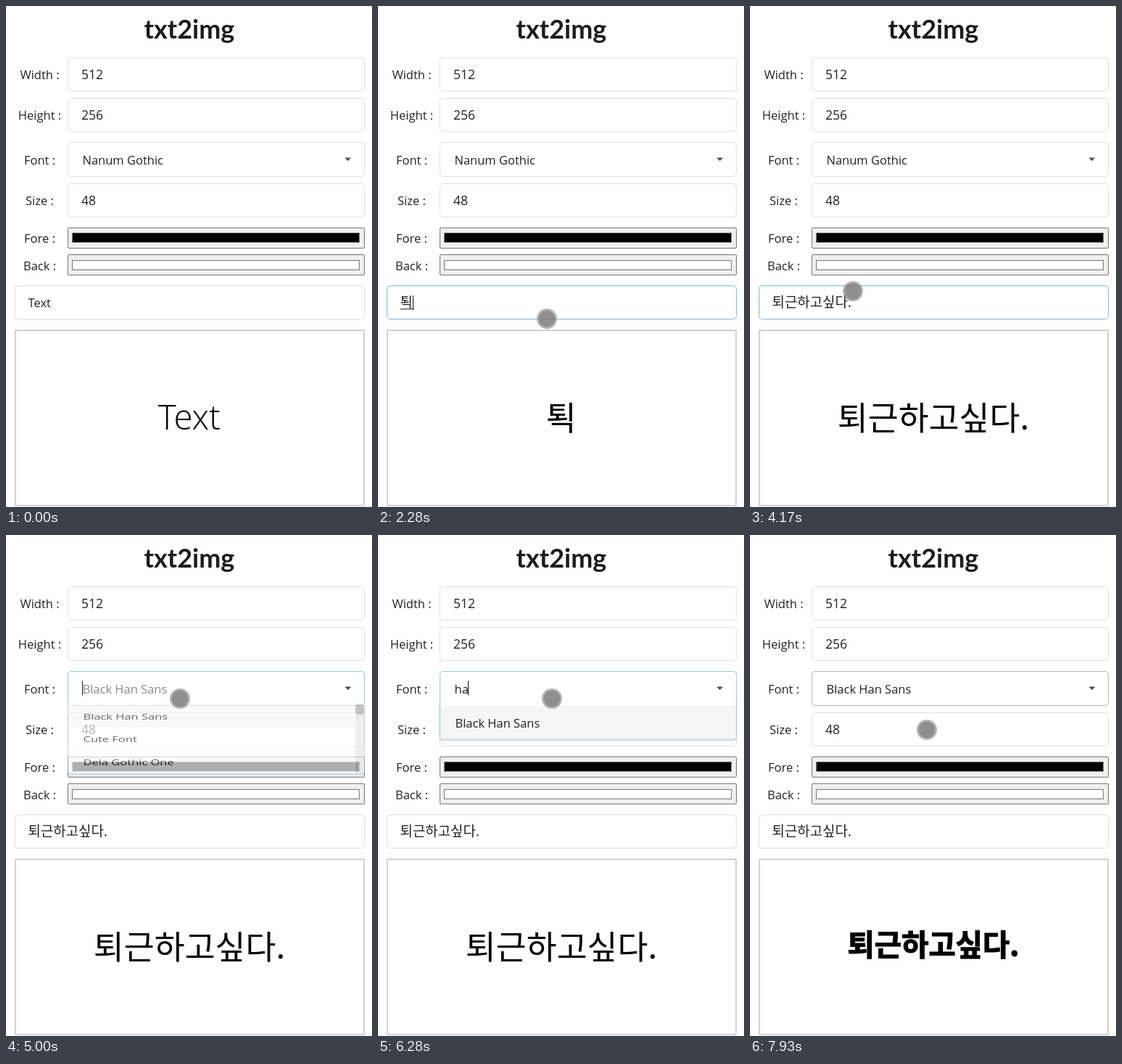
These frames come from a looping animation (505x692 px, 8 s). An HTML page:

```html
<!DOCTYPE html>
<html lang="ko">
<head>
<meta charset="utf-8">
<title>txt2img</title>
<style>
html, body { margin: 0; width: 100%; height: 100%; overflow: hidden; background: #fff; }
svg { display: block; width: 505px; height: 692px; }
text { font: 16.5px "Open Sans", "Noto Sans", sans-serif; fill: #222; white-space: pre; }
.title { font: 700 36px Lato, sans-serif; fill: #1b1c1d; }
.label, .title, #preview { text-anchor: middle; }
.num { font-size: 17.6px; }
.box { fill: #fff; stroke: #dededf; }
.well { fill: #efefef; stroke: #767676; }
.swatch { stroke: #777; }
#entry { font-family: "Open Sans", "Noto Sans CJK KR", sans-serif; }
#entry.ko { font: 300 18.9px "Noto Sans CJK KR", sans-serif; }
#pick.dim { fill: #8b8b8b; }
#preview { fill: #000; }
#preview.latin { font: 300 47.5px "Open Sans", sans-serif; }
#preview.ko { font: 400 45.6px "Noto Sans CJK KR", sans-serif; }
#preview.wide { font: 400 48px "Noto Sans CJK KR", sans-serif; }
#preview.black { font: 900 40.5px "Noto Sans CJK KR", sans-serif; stroke: #000; stroke-width: 1.2px; }

.step { animation: 8s step-end infinite; }
#field { animation-name: field; }
#select { animation-name: select; }
#full { animation-name: full; }
#one { animation-name: one; }
#hit { animation-name: hit; }
#mark { animation-name: mark; }
#menu { transform-origin: 0 231px; animation: menu 8s linear infinite; filter: drop-shadow(0 2px 1.5px rgba(34,36,38,.15)); }
#pointer { animation: move 8s linear infinite, appear 8s step-end infinite; }

@keyframes field { 0% { stroke: #dededf } 14.5% { stroke: #85b7d9 } 60.8% { stroke: #dededf } }
@keyframes select { 0% { stroke: #dededf } 60.8% { stroke: #96c8da } 89.25% { stroke: #b5b5b6 } }
@keyframes full { 0% { visibility: visible } 78.5% { visibility: hidden } }
@keyframes one { 0% { visibility: hidden } 78.5% { visibility: visible } }
@keyframes hit { 0% { font-weight: 400 } 85.1% { font-weight: 700 } }
@keyframes mark { 0% { visibility: hidden } 16.1% { visibility: visible } 19.35% { visibility: hidden } }
@keyframes menu {
  0%, 60.8% { transform: scaleY(0); opacity: 0 }
  63.3%, 89% { transform: none; opacity: 1 }
  91.75%, 100% { transform: scaleY(0); opacity: 0 }
}
@keyframes appear { 0% { visibility: hidden } 5% { visibility: visible } }
@keyframes move {
  0%, 5% { transform: translate(425px, 653px) }
  8% { transform: translate(350px, 585px) }
  10.5% { transform: translate(266px, 515px) }
  12.5% { transform: translate(224px, 477px) }
  14.5%, 48.2% { transform: translate(233px, 432px) }
  49.4% { transform: translate(226px, 437px) }
  50.5% { transform: translate(196px, 428px) }
  52.1%, 52.9% { transform: translate(142px, 394px) }
  53.8% { transform: translate(130px, 363px) }
  55.3% { transform: translate(148px, 310px) }
  56.8% { transform: translate(196px, 262px) }
  58.2% { transform: translate(234px, 235px) }
  60%, 96.8% { transform: translate(240px, 226px) }
  98.2% { transform: translate(243px, 258px) }
  99.1%, 100% { transform: translate(244px, 269px) }
}
</style>
</head>
<body>
<svg viewBox="0 0 505 692">
  <text class="title" x="253" y="45">txt2img</text>

  <text class="label" x="46.5" y="101">Width :</text>
  <text class="label" x="46.5" y="157">Height :</text>
  <text class="label" x="46.5" y="219">Font :</text>
  <text class="label" x="46.5" y="275">Size :</text>
  <text class="label" x="46.5" y="327">Fore :</text>
  <text class="label" x="46.5" y="365">Back :</text>

  <rect class="box" x="85.5" y="71.5" width="409" height="46" rx="4"/>
  <text class="num" x="104" y="101">512</text>
  <rect class="box" x="85.5" y="127.5" width="409" height="46" rx="4"/>
  <text class="num" x="104" y="157">256</text>
  <rect class="box" x="85.5" y="245.5" width="409" height="46" rx="4"/>
  <text class="num" x="104" y="275">48</text>

  <rect class="well" x="85.5" y="306.5" width="409" height="28" rx="1.5"/>
  <rect class="swatch" x="91.5" y="313.5" width="396" height="13"/>
  <rect class="well" x="85.5" y="343.5" width="409" height="28" rx="1.5"/>
  <rect class="swatch" x="91.5" y="351.5" width="396" height="13" fill="#fff"/>

  <rect id="field" class="box step" x="12.5" y="386.5" width="482" height="46" rx="4"/>
  <rect id="mark" class="step" x="30" y="399" width="34" height="21" fill="#c1c1c1"/>
  <text id="entry" x="30.5" y="416"></text>
  <path id="under" stroke="#333"/>

  <rect x="13" y="448" width="481" height="242" fill="#fff" stroke="#d2d2d3" stroke-width="2"/>
  <text id="preview" x="253"></text>

  <rect id="select" class="box step" x="85.5" y="188.5" width="409" height="47" rx="4"/>
  <g id="menu">
    <g id="full" class="step">
      <path d="M85.5 231V371q0 4 4 4H490.500q4 0 4-4V231" fill="#fff" stroke="#96c8da"/>
      <path d="M86 236H482V282H86z" fill="#f6f6f6"/>
      <path d="M86 328.500H482" stroke="#fafafa"/>
      <path d="M482 236H494V371q0 3-3 3H482z" fill="#e6e6e6"/>
      <rect x="482" y="235" width="12" height="21" rx="5" fill="#a9a9a9"/>
      <text x="106.500" y="266">Black Han Sans</text>
      <text x="106.500" y="312">Cute Font</text>
      <text x="106.500" y="358">Dela Gothic One</text>
    </g>
    <g id="one" class="step">
      <path d="M85.5 231V278q0 4 4 4H490.500q4 0 4-4V231" fill="#fff" stroke="#96c8da"/>
      <path d="M86 236H494V278q0 3.500-3.500 3.500H89.500q-3.500 0-3.500-3.500z" fill="#f6f6f6"/>
      <text id="hit" class="step" x="106.500" y="266">Black Han Sans</text>
    </g>
  </g>
  <text id="pick" x="105.500" y="219"></text>
  <path d="M468.200 210H475.300L471.750 213.500z" fill="#4a4a4a" stroke="#4a4a4a" stroke-linejoin="round"/>
  <path id="caret" stroke="#111"/>

  <g id="pointer">
    <circle r="14" fill="#7d7d7d" fill-opacity=".58"/>
    <circle r="11.300" fill="#808080" fill-opacity=".7"/>
  </g>
</svg>
<script>
const LOOP = 8000;
const $ = id => document.getElementById(id);
const entry = $('entry'), preview = $('preview'), pick = $('pick');

// [start ms, text]
const typed = [
  [0, 'Text'], [1550, ''], [2010, 'ㅌ'], [2150, '퇴'], [2280, '퇵'], [2350, '퇴그'],
  [2420, '퇴근'], [2490, '퇴근ㅎ'], [2550, '퇴근하'], [2680, '퇴근학'], [2750, '퇴근하고'],
  [2820, '퇴근하곳'], [2890, '퇴근하고시'], [2960, '퇴근하고싶'], [3170, '퇴근하고싶ㄷ'],
  [3240, '퇴근하고싶다'], [3370, '퇴근하고싶다.']
];
// [start ms, class, baseline]
const faces = [[0, 'latin', 585], [1550, 'ko', 586], [6810, 'wide', 583], [6880, 'black', 581]];
const picked = [
  [0, 'Nanum Gothic'], [4864, 'Black Han Sans', 'dim'], [6210, 'h'], [6280, 'ha'],
  [6350, 'han'], [7140, 'Black Han Sans']
];
// [from, to, place]
const carets = [
  [1160, 1290, 'entry'], [1550, 3900, 'entry'], [4430, 4864, 'entry'],
  [4864, 5280, 'start'], [5540, 6010, 'start'], [6210, 6880, 'pick'], [7270, 7800, 'start']
];

const at = (list, t) => list.findLast(s => s[0] <= t);
const put = (el, text, cls) => {
  if (el.textContent !== text) el.textContent = text;
  el.setAttribute('class', cls);
};
const vline = (x, y) => `M${Math.round(x) + .5} ${y}v20`;

function draw(t) {
  const text = at(typed, t)[1];
  const [, face, base] = at(faces, t);
  const [, font, tone = ''] = at(picked, t);
  put(entry, text, t < 1550 ? '' : 'ko');
  put(preview, text, face);
  preview.setAttribute('y', base);
  put(pick, font, tone);

  const end = 30.5 + (text ? entry.getComputedTextLength() : 0);
  const composing = t >= 2010 && t < 3370;
  $('under').setAttribute('d', composing ? `M${end - 17.4} 418.5H${end}` : '');

  const on = carets.find(c => c[0] <= t && t < c[1]);
  $('caret').setAttribute('d', !on ? '' :
    on[2] === 'entry' ? vline(end, 400) :
    vline(on[2] === 'pick' ? 105 + pick.getComputedTextLength() : 105, 201.5));
}

let start;
function tick(now) {
  start ??= now;
  draw((now - start) % LOOP);
  requestAnimationFrame(tick);
}
draw(0);
requestAnimationFrame(tick);
</script>
</body>
</html>
```
